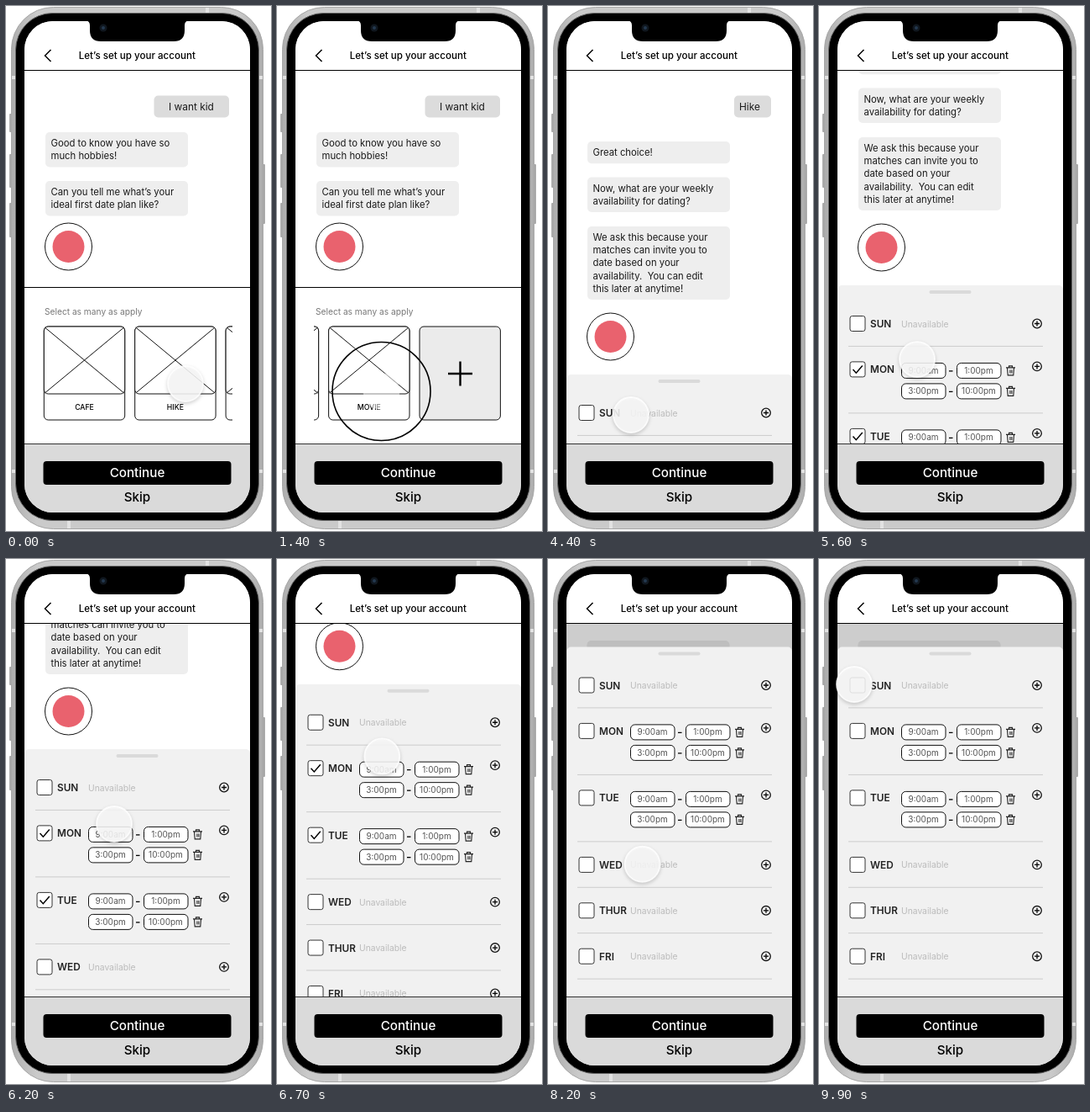
Recreate the animation shown at these times as an HTML page. Size 316 px wide and 624 px high, loop 10 s.

```html
<!DOCTYPE html>
<html lang="en">
<head>
<meta charset="utf-8">
<title>Account setup</title>
<style>
  html, body { margin: 0; width: 100%; height: 100%; overflow: hidden; background: #fff; }
  svg { display: block; font: 11.3px Inter, sans-serif; }
  #cursor { filter: drop-shadow(0 2px 2px rgba(0, 0, 0, .2)); }
  #cursor.faint { filter: none; opacity: .6; }
</style>
</head>
<body>
<svg id="stage" width="316" height="624" viewBox="0 0 316 624"></svg>
<script>
const rect = (x, y, w, h, r, fill, more = '') =>
  `<rect x="${x}" y="${y}" width="${w}" height="${h}" rx="${r}" fill="${fill}" ${more}/>`;
const text = (x, y, s, more = '') => `<text x="${x}" y="${y}" ${more}>${s}</text>`;
const path = (d, width = 1, color = '#000') =>
  `<path d="${d}" fill="none" stroke="${color}" stroke-width="${width}"/>`;
const ink = 'stroke="#111"';
const mid = 'text-anchor="middle"';

// Chat
const bubble = (y, lines) => rect(47, y, 170, 11 + 15.2 * lines.length, 5, '#eee') +
  lines.map((s, i) => text(53.5, y + 17 + 15.2 * i, s, 'fill="#1a1a1a"')).join('');
const reply = (x, tx, s) => rect(x, 106.5, 266 - x, 26, 5, '#dcdcdc') +
  text(tx, 123.5, s, 'font-size="11.9" fill="#1a1a1a"');
const avatar = y => `<circle cx="74.5" cy="${y}" r="28" fill="#fff" ${ink}/>
  <circle cx="74.5" cy="${y}" r="19" fill="#e9626e"/>`;

// Cards
const cardW = 96.4;
const cardX = i => 45.3 + 108.4 * i;
const card = (label, i, fill = '#fff') => {
  const x = cardX(i);
  return rect(x, 381, cardW, 111, 5, fill, ink) + rect(x, 381, cardW, 80, 5, '#fff', ink) +
    path(`M${x + 1} 382l94.4 78m0-78l-94.4 78`, 1, '#111') +
    text(x + cardW / 2, 480, label, mid + ' font-size="8.7" font-weight="500"');
};
const plusCard = i => rect(cardX(i), 381, cardW, 111, 5, '#ebebeb', ink) +
  path(`M${cardX(i) + 34} 437h29m-14.5-14.5v29`, 2.4);
const chosen = `<g id="chosen">${card('CAFE', 0, '#e0e0e0')}
  ${rect(cardX(0), 381, cardW, 111, 5, 'none', 'stroke="#000" stroke-width="2.2"')}
  ${path(`M${cardX(0)} 461h${cardW}`, 1.8)}</g>`;

// Availability sheet
const chip = (x, y, s) => rect(x, y - 9, 52.5, 18, 5, '#fff', ink) +
  text(x + 26, y + 3.5, s, mid + ' font-size="10" fill="#555"');
const trash = y => path(`M223 ${y - 3.5}h11m-7.5 0v-2h4v2m-6 0l.7 9h6.6l.7-9m-4.6 2.5v4m2-4v4`, 1.1, '#222');
const slot = (y, from, to) => chip(98.5, y, from) + path(`M155 ${y + .5}h4.5`, 1.3) +
  chip(164.5, y, to) + trash(y);

const days = ['SUN', 'MON', 'TUE', 'WED', 'THUR', 'FRI', 'SAT'];
function sheet(top, shown, checked) {
  let y = top + 18;
  let out = rect(22.5, top, 268.5, 620, 5, '#f1f1f1') + rect(131.5, top + 6, 50, 4, 2, '#dadada');
  for (const day of shown) {
    const open = ['MON', 'TUE', 'SAT'].includes(day);
    const c = y + 27.5, p = open ? c - 3.5 : c;
    out += rect(37, c - 9, 18, 18, 2.5, '#fff', 'stroke="#333"') +
      text(61, c + 4.5, day, 'font-size="11.8" font-weight="600" fill="#222"') +
      `<circle cx="260" cy="${p}" r="5.3" fill="none" stroke="#111" stroke-width="1.3"/>` +
      path(`M257 ${p}h6m-3-3v6`, 1.3);
    if (open) out += slot(c + 1.5, '9:00am', '1:00pm') + slot(c + 26, '3:00pm', '10:00pm');
    else out += text(98, c + 4, 'Unavailable', 'font-size="10.3" fill="#bbb"');
    if (open && checked) out += path(`M40.5 ${c}l3.8 4.3 7.5-8.8`, 1.5);
    y += open ? 79.5 : 54.4;
    out += path(`M35 ${y}h232`, 1, '#ccc');
  }
  return out;
}

const page = rect(22, 77, 269, 444, 0, '#fff');
const hobbies = page + reply(176.5, 194, 'I want kid') +
  bubble(150, ['Good to know you have so', 'much hobbies!']) +
  bubble(208, ['Can you tell me what’s your', 'ideal first date plan like?']) + avatar(286) +
  path('M22 334.5h269') + text(46, 367, 'Select as many as apply', 'font-size="10.2" fill="#777"') +
  `<g clip-path="url(#strip)"><g id="cards">${['CAFE', 'HIKE', 'MOVIE'].map((s, i) => card(s, i)).join('')}
  ${plusCard(3)}${chosen}</g></g>`;
const dates = reply(222, 228, 'Hike') + bubble(161, ['Great choice!']) +
  bubble(203.5, ['Now, what are your weekly', 'availability for dating?']) +
  bubble(262, ['We ask this because your', 'matches can invite you to', 'date based on your',
    'availability.\u00a0 You can edit', 'this later at anytime!']) +
  avatar(393) + sheet(438, days, true);
const expanded = rect(22, 77, 269, 444, 0, '#cdcdcd') + rect(46.5, 97, 170, 30, 5, '#bebebe') +
  sheet(104.5, days.slice(0, 6), false);

const body = rect(4, 128, 5, 22, 1, '#aaa') + rect(4, 176, 5, 40, 1, '#aaa') +
  rect(4, 234, 5, 41, 1, '#aaa') + rect(304, 188, 5, 71, 1, '#aaa') +
  rect(6.5, 1.5, 300, 620, 50, 'url(#metal)', 'stroke="#a6a6a6"') +
  path('M7 85h5m289 0h5M7 553h5m289 0h5M240 2v7M75 612v9', 4, '#e2e2e2') +
  rect(11.5, 8.5, 290, 603, 44, '#000', 'stroke="#666"') + rect(22, 18, 269, 584, 34, '#fff');
const header = rect(22, 18, 269, 58, 0, '#fff') + path('M22 76.5h269') +
  path('M53.5 52l-7 7 7 7', 1.5) +
  text(156.3, 63, 'Let’s set up your account', mid + ' font-size="11.6" font-weight="500"');
const footer = rect(22, 521, 269, 82, 0, '#dadada') + path('M22 520.5h269', 1, '#333') +
  rect(44.5, 541, 224, 28, 4, '#000') +
  text(156.5, 560, 'Continue', mid + ' font-size="15.2" font-weight="500" fill="#fff"') +
  text(156.5, 588.5, 'Skip', mid + ' font-size="15.2" font-weight="500"');
const notch = `<path d="M95 17h123q-5 1-5 6v6q0 13-13 13h-87q-13 0-13-13v-6q0-5-5-6z"/>
  <circle cx="116" cy="26" r="4.5" fill="#10171f"/><circle cx="116" cy="26" r="2" fill="#24384f"/>`;

document.getElementById('stage').innerHTML = `
  <defs>
    <linearGradient id="metal"><stop stop-color="#adadad"/><stop offset=".1" stop-color="#cacaca"/>
      <stop offset=".9" stop-color="#cacaca"/><stop offset="1" stop-color="#adadad"/></linearGradient>
    <clipPath id="screen">${rect(22, 18, 269, 584, 34, '#000')}</clipPath>
    <clipPath id="view">${rect(22, 77, 269, 444, 0, '#000')}</clipPath>
    <clipPath id="strip">${rect(44, 378, 226, 118, 0, '#000')}</clipPath>
  </defs>
  ${body}
  <g clip-path="url(#screen)">
    <g clip-path="url(#view)">
      <g>${hobbies}</g>
      <g id="dates">${page}<g id="scroll">${dates}</g></g>
      <g id="expanded">${expanded}</g>
    </g>
    ${header}${footer}
  </g>
  ${notch}
  <circle id="ring" cx="124.5" cy="458" fill="none" stroke="#000" stroke-width="1.6"/>
  <g id="cursor"><circle id="disc" r="21" stroke="#fff" stroke-opacity=".8" stroke-width="1.8"/></g>`;

// Eased value between [time, value] stops
function at(t, stops) {
  const i = stops.findIndex(s => s[0] > t);
  if (i < 0) return stops[stops.length - 1][1];
  if (!i) return stops[0][1];
  const [t0, a] = stops[i - 1], [t1, b] = stops[i];
  const u = (t - t0) / (t1 - t0);
  return a + (b - a) * u * u * (3 - 2 * u);
}

const route = [
  [0, 214, 449], [500, 92, 454], [1100, 124.5, 458], [1500, 124.5, 458], [2000, 235, 450],
  [2500, 95, 440], [2600, 95, 440], [3000, 197, 559], [3900, 197, 559], [4400, 99, 486],
  [4900, 108, 500], [5100, 108, 500], [6200, 129, 315], [6800, 125, 228], [7300, 64, 204],
  [7700, 62, 212], [8400, 125, 400], [8900, 24, 272], [9100, 24, 272], [9800, 42, 149]
];
const xs = route.map(([t, x]) => [t, x]);
const ys = route.map(([t, , y]) => [t, y]);
const set = (id, name, value) => document.getElementById(id).setAttribute(name, value);

function draw() {
  const t = Math.floor(performance.now() % 10000 / 100) * 100;
  const tap = t >= 1200 && t < 1600;
  const pressed = t >= 2900 && t < 4000;
  const scroll = at(t, [[5100, 0], [6100, 212], [6200, 212], [7100, 344.5]]);
  const slide = at(t, [[0, 0], [1000, 200.5], [1500, 200.5], [2200, 0]]);
  set('cards', 'transform', `translate(${-slide})`);
  set('chosen', 'opacity', t >= 2700 ? 1 : 0);
  set('dates', 'opacity', at(t, [[3300, 0], [3500, 1]]));
  set('scroll', 'transform', `translate(0 ${-scroll})`);
  set('expanded', 'opacity', at(t, [[7800, 0], [8100, 1]]));
  set('ring', 'opacity', tap ? 1 : 0);
  set('ring', 'r', at(t, [[1100, 22], [1400, 58.5]]));
  set('cursor', 'transform', `translate(${at(t, xs)} ${at(t, ys)})`);
  set('cursor', 'class', tap ? 'faint' : '');
  set('disc', 'fill', tap ? '#fff' : pressed ? '#c6c6c2' : '#f8f8f8');
  set('disc', 'fill-opacity', .87);
  requestAnimationFrame(draw);
}
draw();
</script>
</body>
</html>
```
